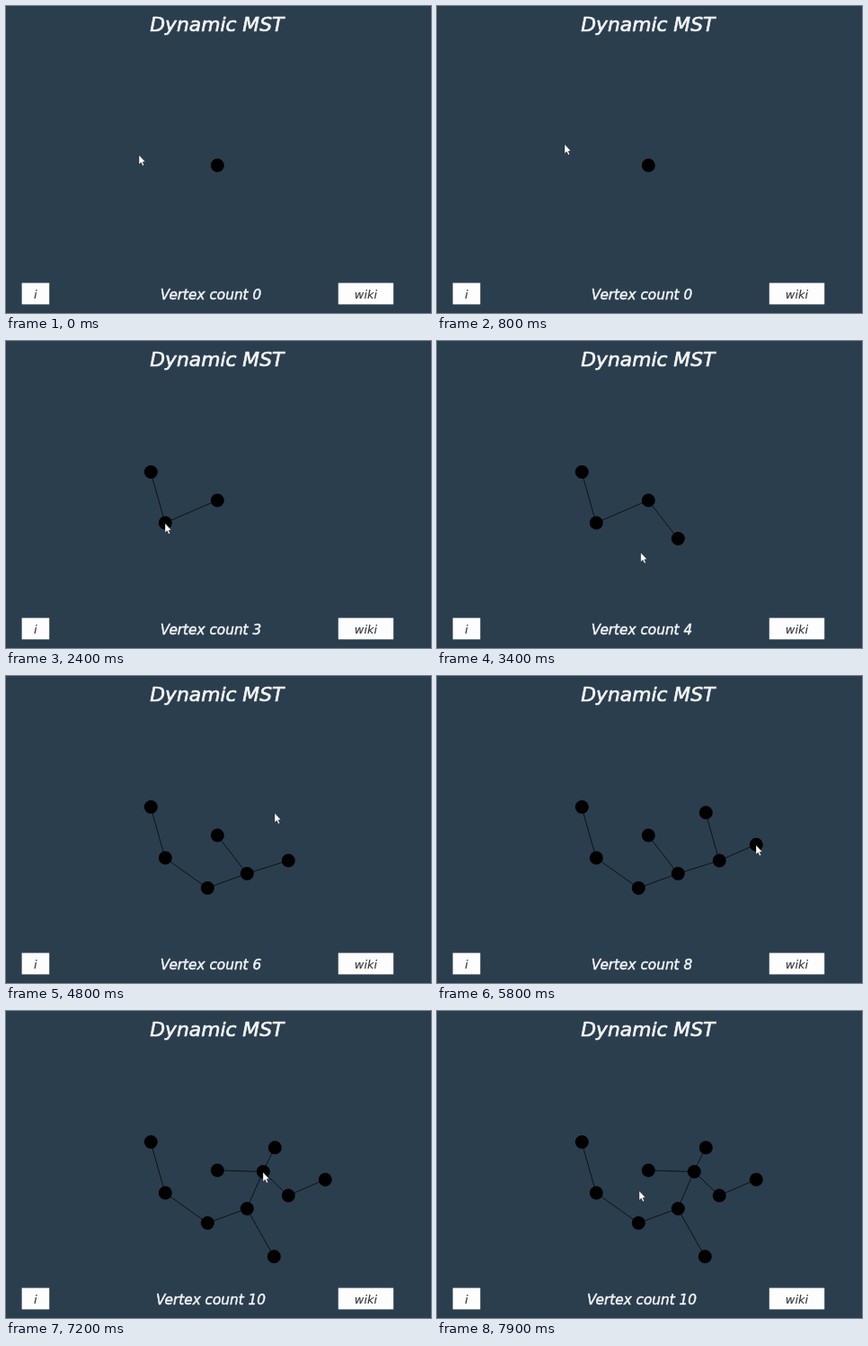
Animation, 473 px wide and 341 px high, one loop 8000 ms. Source, as an HTML page with a canvas:

```html
<!DOCTYPE html>
<html lang="en">
<head>
<meta charset="utf-8">
<title>Dynamic MST</title>
<style>
  html, body { margin: 0; width: 100%; height: 100%; overflow: hidden; background: #2b3e4e; }
  canvas { display: block; }
</style>
</head>
<body>
<canvas id="stage" width="473" height="341"></canvas>
<script>
const ctx = document.getElementById('stage').getContext('2d');
const LOOP = 8000;
const TICK = 100;
const LIGHT = '#f3f5f8';
const snap = t => Math.floor(t / TICK) * TICK;
const point = (x, y) => ({ x, y });

// Vertices in the order they are placed
const vertices = [
  point(235, 177), point(161, 145.5), point(177, 202), point(268, 219.5),
  point(224, 235.5), point(314, 205), point(299, 151.7), point(355, 187.3),
  point(298, 272.7), point(286, 178.5)
];

// Clicks come at a steady beat; the pointer sets off a little before each
const BEAT = 690;
const clickTime = i => snap(1025 + BEAT * i);
const leaveTime = i => snap(645 + BEAT * i);

const START = point(148, 165);
const move = (start, ticks, to) => ({ start, ticks, to });
const moves = [
  move(500, 4, point(142, 153)),
  move(1000, 3, point(149, 168)),
  move(1300, 3, vertices[1]),
  ...vertices.slice(2).map((v, i) => move(leaveTime(i + 2), 2, v)),
  move(7600, 4, point(225, 199.3))
];

const easeOut = u => 1 - (1 - u) ** 4;
const dist = (a, b) => Math.hypot(a.x - b.x, a.y - b.y);

function pointerAt(t) {
  let { x, y } = START;
  for (const { start, ticks, to } of moves) {
    if (t < start) break;
    const k = easeOut(Math.min(1, ((t - start) / TICK + 1) / ticks));
    x += (to.x - x) * k;
    y += (to.y - y) * k;
  }
  return { x, y };
}

// Prim's algorithm
function spanningTree(points) {
  const tree = [points[0]];
  const rest = points.slice(1);
  const edges = [];
  while (rest.length) {
    let best = null;
    for (const a of tree) {
      for (const b of rest) {
        const d = dist(a, b);
        if (!best || d < best.d) best = { a, b, d };
      }
    }
    edges.push(best);
    tree.push(best.b);
    rest.splice(rest.indexOf(best.b), 1);
  }
  return edges;
}

function label(text, x, y, size, color, weight) {
  ctx.font = `italic ${size}px "DejaVu Sans", sans-serif`;
  ctx.textAlign = 'center';
  ctx.lineJoin = 'round';
  ctx.fillStyle = ctx.strokeStyle = color;
  ctx.lineWidth = weight;
  ctx.fillText(text, x, y);
  ctx.strokeText(text, x, y);
}

function button(text, x, width) {
  ctx.fillStyle = '#fdfdfe';
  ctx.fillRect(x, 307.6, width, 23.8);
  label(text, x + width / 2, 324.5, 13, '#34373d', 0.1);
}

function drawEdge({ a, b }) {
  ctx.strokeStyle = 'rgba(0, 0, 0, 0.7)';
  ctx.lineWidth = 1;
  ctx.beginPath();
  ctx.moveTo(a.x, a.y);
  ctx.lineTo(b.x, b.y);
  ctx.stroke();
}

function drawVertex({ x, y }) {
  ctx.fillStyle = '#000';
  ctx.beginPath();
  ctx.arc(x + 0.3, y, 7.5, 0, Math.PI * 2);
  ctx.fill();
}

const arrow = new Path2D('M0 0V10.5L2.4 8.3 4 12 5.7 11.3 4.1 7.7 7 7.5Z');

function drawPointer({ x, y }) {
  ctx.save();
  ctx.translate(x, y + 0.5);
  ctx.fillStyle = '#fff';
  ctx.fill(arrow);
  ctx.strokeStyle = 'rgba(0, 0, 0, 0.6)';
  ctx.lineWidth = 0.6;
  ctx.stroke(arrow);
  ctx.restore();
}

function draw(time) {
  const t = snap(time % LOOP);
  const placed = vertices.filter((v, i) => i === 0 || clickTime(i) <= t);
  const count = placed.length > 1 ? placed.length : 0;

  ctx.fillStyle = '#2b3e4e';
  ctx.fillRect(0, 0, 473, 341);

  label('Dynamic MST', 234.8, 27.5, 21.8, LIGHT, 0.7);
  label('Vertex count ' + count, 228, 326, 15.3, LIGHT, 0.5);
  button('i', 17.6, 30.6);
  button('wiki', 369.8, 61.4);

  spanningTree(placed).forEach(drawEdge);
  placed.forEach(drawVertex);
  drawPointer(pointerAt(t));
}

const begin = performance.now();
function frame() {
  draw(performance.now() - begin);
  requestAnimationFrame(frame);
}
frame();
</script>
</body>
</html>
```
